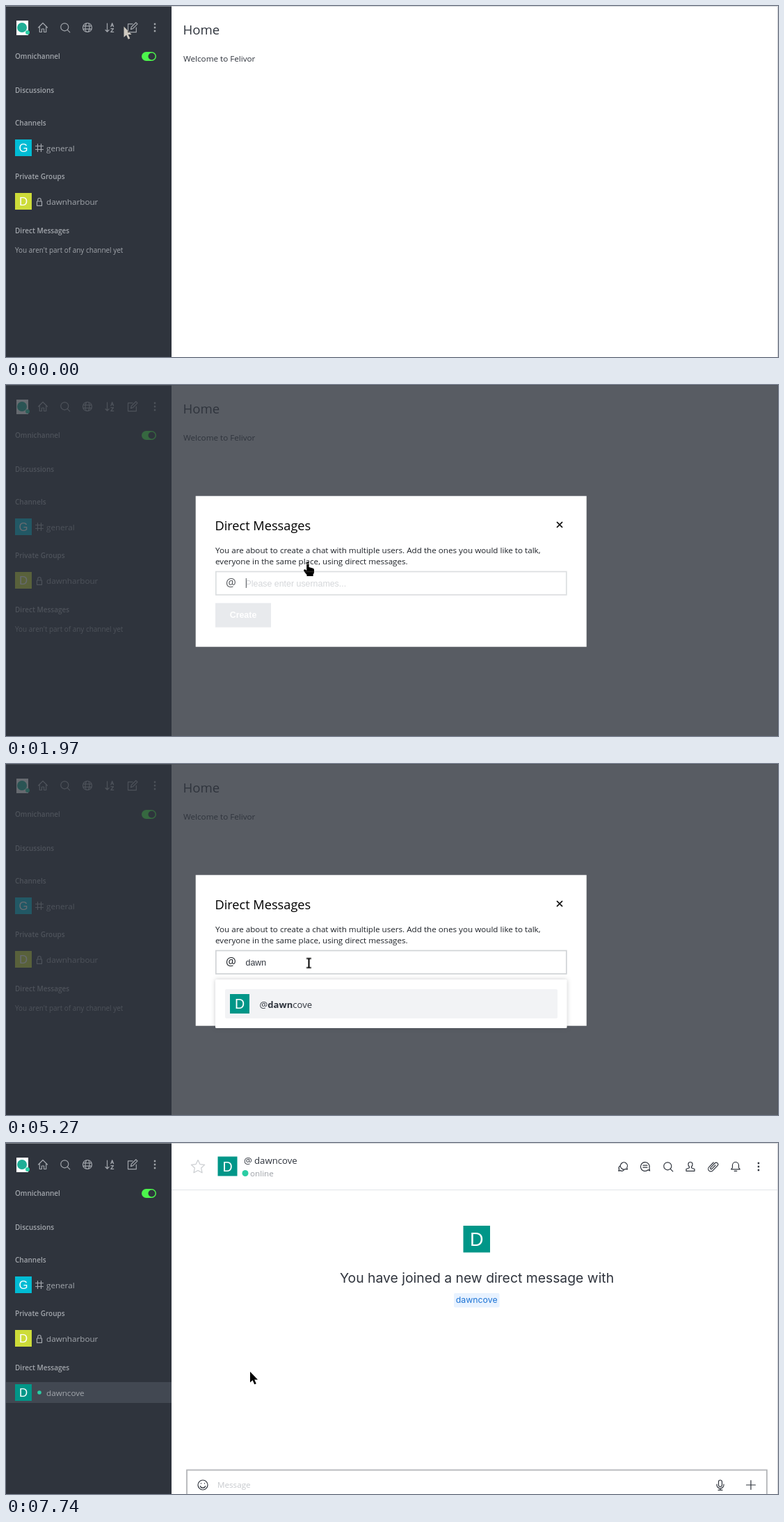
Write an HTML page that moves like this. It is 1110 px wide and 505 px high and loops after 8000 ms.

```html
<!DOCTYPE html>
<html lang="en">
<head>
<meta charset="utf-8">
<title>Starting a direct message</title>
<style>
html, body { margin: 0; width: 100%; height: 100%; overflow: hidden; background: #fff; }
svg { display: block; width: 1110px; height: 505px; }
text { font: 11.66px "Open Sans", "Noto Sans", sans-serif; white-space: pre; }
.arial { font: 12.4px "Liberation Sans", Arial, sans-serif; }
.inter { font: 12.3px Inter, sans-serif; text-anchor: middle; }
.head { font-size: 10px; font-weight: 600; }
.bold { font-weight: 700; }
.pale { fill: #c6c9cd; }
.line { fill: none; stroke: currentColor; stroke-width: 1.2; stroke-linejoin: round; stroke-linecap: round; }
.solid { fill: currentColor; }
.avatar text { fill: #fff; font-family: "Liberation Sans", Arial, sans-serif; text-anchor: middle; }
.cursor { fill: #fff; mix-blend-mode: difference; }
.shadow { filter: drop-shadow(0 0 3px rgba(47, 52, 61, .25)); }
</style>
</head>
<body>
<svg viewBox="0 0 1110 505">
  <defs>
    <path id="i-home" class="line" d="M-6.5 0L0-6.5 6.5 0M-4.7-1.5V6.5H-1.6V2H1.6V6.5H4.7V-1.5"/>
    <path id="i-search" class="line" d="M4.8-.7A5.5 5.5 0 1 1-6.2-.7 5.5 5.5 0 1 1 4.8-.7M3.3 3.3L6.8 6.8"/>
    <path id="i-globe" class="line" d="M6.5 0A6.5 6.5 0 1 1-6.5 0 6.5 6.5 0 1 1 6.5 0M3 0A3 6.5 0 1 1-3 0 3 6.5 0 1 1 3 0M-6-2.2H6M-6 2.2H6"/>
    <path id="i-sort" class="line" d="M-3.5-6V6M-6 3.5L-3.5 6-1 3.5M1.8-1.2L3.7-6.3 5.6-1.2M2.5-2.8H5M1.9 1.6H5.5L1.8 6.4H5.7"/>
    <path id="i-edit" class="line" d="M0-5.2H-6.5V6.7H5.3V0M-2.5 2.6L-1.7-.7 4.9-7.2 7-5.1 .5 1.5Z"/>
    <path id="i-more" class="solid" d="M-1.2-6.2h2.4v2.4h-2.4zM-1.2-1.2h2.4v2.4h-2.4zM-1.2 3.8h2.4v2.4h-2.4z"/>
    <path id="i-hash" class="line" d="M-2.5-5.5V5.5M2.5-5.5V5.5M-5.5-2.5H5.5M-5.5 2.5H5.5"/>
    <path id="i-lock" class="line" d="M-3.5-1H3.5V5.3H-3.5ZM-2.2-1V-3.3A2.2 2.2 0 0 1 2.2-3.3V-1"/>
    <path id="i-people" class="line" d="M1.8-1A1.8 1.8 0 1 1-1.8-1 1.8 1.8 0 1 1 1.8-1M-3 5.2C-3 1.5 3 1.5 3 5.2ZM-2.2-4A1.6 1.6 0 1 0-4-1.6M2.2-4A1.6 1.6 0 1 1 4-1.6M-4-1C-6.3-.6-6.3 2-5.5 3H-4M4-1C6.3-.6 6.3 2 5.5 3H4"/>
    <path id="i-talk" class="line" d="M-2.3 2.2A5 5 0 1 1 5.7 1.5L6.4 3.9 3.9 3.4A5 5 0 0 1-2.3 2.2M-4.2-1C-6 .4-6.2 2.2-5.4 3.6L-6.2 6.2-3.5 5.6C-1.8 6.5.6 6.2 1.8 4.4"/>
    <path id="i-thread" class="line" d="M4.5 4.5A6.4 6.4 0 1 1 6 2L6.6 6ZM-3-1.8H3M-3 1.2H3"/>
    <path id="i-person" class="line" d="M0-6.5C4-6.5 3.6-1.5 1.5.3V1.7L6 3.5V6.3H-6V3.5L-1.5 1.7V.3C-3.6-1.5-4-6.5 0-6.5Z"/>
    <path id="i-clip" class="line" d="M3-2L-2.2 3.4A1.3 1.3 0 0 1-4 1.6L2.2-5A2.5 2.5 0 0 1 6-1.4L-1 5.8A3.6 3.6 0 0 1-6.2.6L.2-6"/>
    <path id="i-bell" class="line" d="M-6.3 3.8L-4.5 1.5V-2A4.5 4.5 0 0 1 4.5-2V1.5L6.3 3.8ZM-1.8 6.3H1.8"/>
    <path id="i-smile" class="line" d="M7 0A7 7 0 1 1-7 0 7 7 0 1 1 7 0M-3.7 1.7C-2.5 5 2.5 5 3.7 1.7M-2.5-2.3v.3M2.5-2.3v.3"/>
    <path id="i-mic" class="line" d="M-2.5-4.5A2.5 2.5 0 0 1 2.5-4.5V0A2.5 2.5 0 0 1-2.5 0ZM-5-1V0A5 5 0 0 0 5 0V-1M0 5V7.3M-3 7.3H3"/>
    <path id="i-plus" class="line" d="M-6.5 0H6.5M0-6.5V6.5"/>
    <path id="i-star" class="line" d="M0-9.5L2.9-3.4 9.6-2.6 4.7 2 6 8.8 0 5.5-6 8.8-4.7 2-9.6-2.6-2.9-3.4Z"/>
  </defs>

  <rect width="1110" height="505" fill="#fff"/>

  <g id="home" fill="#2f343d">
    <text x="254.5" y="41.4" style="font-size:18.6px">Home</text>
    <text x="255" y="79.5">Welcome to Felivor</text>
  </g>

  <g id="chat" fill="#2f343d" color="#2f343d">
    <path d="M238 67.5H1109" stroke="#e1e4e8"/>
    <g color="#cbced1" data-icons="star:276,34"></g>
    <g data-avatar="D,304.5,19.5,28,#009688"></g>
    <text x="342" y="30" style="font-size:13.2px">@</text>
    <text x="357" y="30" style="font-size:13.2px">dawncove</text>
    <circle cx="344" cy="43.5" r="4.5" fill="#2acda4"/>
    <text x="351" y="48" fill="#9ea2a8">online</text>
    <g data-icons="talk:887,34 thread:919,34 search:952,34 person:984,34 clip:1017,34 bell:1049,34 more:1082,34"></g>
    <g data-avatar="D,657.5,119,38.5,#009688"></g>
    <text class="inter" x="677" y="201" style="font-size:19.35px">You have joined a new direct message with</text>
    <rect x="644" y="216" width="65.5" height="20.5" rx="2" fill="#e8f2ff"/>
    <text class="inter" x="676.7" y="230.3" fill="#1d74d5">dawncove</text>
    <rect x="260" y="470.5" width="834" height="50" fill="#fff" stroke="#b4b6b9" stroke-width="1.8"/>
    <text class="pale" x="304" y="496">Message</text>
    <g data-icons="smile:283,492 mic:1027,492 plus:1071,492"></g>
  </g>

  <path d="M238 .5H1109.5V505" fill="none" stroke="#d4d6d9"/>
  <rect id="shade" x="238" width="872" height="505" fill="#2f343d" opacity=".8"/>

  <rect width="238" height="505" fill="#2f343d"/>
  <g id="side" fill="#a2a6ac" color="#a2a6ac">
    <path d="M0 .5H238" stroke="#7f848b"/>
    <rect x="15" y="21" width="17" height="21" fill="#fff"/>
    <circle cx="23" cy="31" r="7" fill="#1fae96"/>
    <circle cx="31" cy="38" r="3" fill="#2acda4"/>
    <g data-icons="home:53,31 search:85,31 globe:117,31 sort:149,31 edit:182,31 more:214,31 hash:48,204 lock:48,282"></g>
    <text class="head" x="13" y="75.5">Omnichannel</text>
    <rect x="195" y="66" width="21" height="13" rx="6.5" fill="#4cf54c"/>
    <circle cx="209.5" cy="72.5" r="5" fill="#2f343d"/>
    <text class="head" x="13" y="124.7">Discussions</text>
    <text class="head" x="13" y="172">Channels</text>
    <g data-avatar="G,13,192,24,#00bcd4"></g>
    <text x="58" y="209">general</text>
    <text class="head" x="13" y="249.3">Private Groups</text>
    <g data-avatar="D,13,269,24,#cddc39"></g>
    <text x="58" y="286.3">dawnharbour</text>
    <text class="head" x="13" y="326.8">Direct Messages</text>
    <text id="none" x="13" y="355" style="font-size:9.95px">You aren't part of any channel yet</text>
    <g id="row">
      <rect y="344" width="238" height="30" fill="#424852"/>
      <g data-avatar="D,13,347,24,#009688"></g>
      <circle cx="48" cy="359" r="2.8" fill="#2acda4"/>
      <text x="58" y="363.6">dawncove</text>
    </g>
  </g>

  <g id="tip">
    <rect x="145" y="51" width="74" height="23" rx="2" fill="#1f2329"/>
    <text x="182" y="66.5" fill="#fff" text-anchor="middle" style="font-size:10.5px">Create New</text>
  </g>

  <g id="menu" fill="#2f343d" color="#2f343d">
    <rect class="shadow" x="171" y="50.5" width="142.5" height="117.5" rx="1.5" fill="#fff"/>
    <g data-icons="hash:194,80 people:194,110 talk:194,140"></g>
    <text x="206" y="84">Channel</text>
    <text x="206" y="114">Direct Messages</text>
    <text x="206" y="144">Discussion</text>
  </g>

  <g id="modal">
    <rect x="272.7" y="159.7" width="562" height="217" fill="#fff"/>
    <text x="300.4" y="208.5" style="font-size:18.2px;font-weight:500">Direct Messages</text>
    <path d="M792 197l8 8M800 197l-8 8" stroke="#000" stroke-width="1.7"/>
    <g fill="#1f2329">
      <text x="301" y="241.5">You are about to create a chat with multiple users. Add the ones you would like to talk,</text>
      <text x="301" y="257.7">everyone in the same place, using direct messages.</text>
    </g>
    <g id="field">
      <rect x="301.8" y="268.5" width="504" height="33.4" fill="none" stroke="#d0d3d6" stroke-width="1.7"/>
      <text x="316" y="290" fill="#1f2329" style="font-size:16.5px;font-weight:500">@</text>
      <g id="chip">
        <rect x="337" y="272" width="107.5" height="27" fill="#f2f3f5"/>
        <g data-avatar="D,344,277,17,#009688"></g>
        <text x="368" y="290" fill="#1f2329">dawncove</text>
        <path d="M431 283l5 5M436 283l-5 5" stroke="#2f343d"/>
      </g>
      <text id="hint" class="arial pale" y="289.5">Please enter usernames...</text>
      <text id="typed" class="arial" x="344.5" y="289.5" fill="#2f343d"></text>
      <rect id="caret" y="278" width="1" height="14" fill="#1f2329"/>
      <g id="button">
        <rect x="301" y="313.7" width="80" height="35"/>
        <text class="arial bold" x="341" y="335.4" fill="#fff" text-anchor="middle">Create</text>
      </g>
    </g>
    <g id="list">
      <rect class="shadow" x="301" y="310" width="505.5" height="70" rx="1.5" fill="#fff"/>
      <rect x="315" y="324" width="478" height="42" rx="2" fill="#f2f3f5"/>
      <g data-avatar="D,322,331,28,#009688"></g>
      <text x="364.5" y="350.7" fill="#2f343d" style="font-size:13.1px">@<tspan class="bold">dawn</tspan>cove</text>
    </g>
  </g>

  <path id="arrow" class="cursor" d="M0 0V15.6L3.6 12.3 6.2 18.3 8.8 17.2 6.2 11.4H11Z"/>
  <path id="hand" class="cursor" d="M-1.8.5C-1.8-1.4 1.6-1.4 1.6.5V6L7.5 7.7Q9 8.3 9 10V13Q9 15 7.6 16.5V19H-1.5V17Q-4 14.5-6 11Q-5.6 8.6-3.5 9.6L-1.8 11Z"/>
  <path id="beam" class="cursor" d="M-3.5-7.5H3.5V-5.7H1V5.7H3.5V7.5H-3.5V5.7H-1V-5.7H-3.5Z"/>
  <circle id="click" r="10.7" fill="#faf000" opacity=".52"/>
</svg>

<script>
const $ = id => document.getElementById(id);

for (const g of document.querySelectorAll('[data-icons]'))
  g.innerHTML = g.dataset.icons.split(' ').map(item => {
    const [name, at] = item.split(':'), [x, y] = at.split(',');
    return `<use href="#i-${name}" x="${x}" y="${y}"/>`;
  }).join('');

for (const g of document.querySelectorAll('[data-avatar]')) {
  const [letter, x, y, size, fill] = g.dataset.avatar.split(',');
  g.setAttribute('class', 'avatar');
  g.innerHTML = `<rect x="${x}" y="${y}" width="${size}" height="${size}" fill="${fill}"/>
    <text x="${+x + size / 2}" y="${+y + size * .75}" style="font-size:${size * .7}px">${letter}</text>`;
}

// start time, cursor, x, y, visible parts, typed text
const steps = [
  [0, 'arrow', 169.5, 29.5, 'home'],
  [280, 'hand', 184, 29, 'home'],
  [560, 'hand', 184, 29, 'home tip click'],
  [850, 'hand', 184, 29, 'home menu'],
  [1110, 'hand', 209, 86, 'home menu'],
  [1390, 'hand', 216, 107, 'home menu'],
  [1670, 'hand', 216, 107, 'home menu click'],
  [1970, 'hand', 434, 256, 'home modal hint caret'],
  [2250, 'beam', 435.5, 286.5, 'home modal hint'],
  [2530, 'beam', 435.5, 286.5, 'home modal hint click'],
  [2800, 'beam', 435.5, 286.5, 'home modal hint'],
  [3080, 'beam', 435.5, 286.5, 'home modal hint caret'],
  [3360, 'beam', 435.5, 286.5, 'home modal hint'],
  [3630, 'beam', 435.5, 286.5, 'home modal', 'd'],
  [4160, 'beam', 435.5, 286.5, 'home modal', 'da'],
  [4730, 'beam', 435.5, 286.5, 'home modal', 'daw'],
  [5000, 'beam', 435.5, 286.5, 'home modal', 'dawn'],
  [5270, 'beam', 435.5, 286.5, 'home modal list', 'dawn'],
  [5530, 'hand', 447, 329, 'home modal list caret', 'dawn'],
  [5800, 'hand', 444, 368, 'home modal list caret', 'dawn'],
  [6080, 'hand', 443, 346, 'home modal list', 'dawn'],
  [6350, 'hand', 443, 346, 'home modal list click', 'dawn'],
  [6900, 'hand', 443, 346, 'home modal list hint'],
  [7190, 'hand', 351, 330, 'home modal chip hint'],
  [7480, 'hand', 351, 330, 'home modal chip hint click'],
  [7740, 'arrow', 351, 329, 'chat row']
];
const parts = ['home', 'chat', 'row', 'tip', 'menu', 'modal', 'chip', 'hint', 'caret', 'list', 'arrow', 'hand', 'beam', 'click'];
const show = (id, on) => $(id).style.display = on ? '' : 'none';
let current;

function draw(now) {
  const t = now % 8000;
  const step = steps.findLast(s => s[0] <= t);
  if (step !== current) {
    current = step;
    const [start, cursor, x, y, visible, typed = ''] = step;
    const on = [cursor, ...visible.split(' ')];
    const modal = on.includes('modal'), chip = on.includes('chip');
    for (const id of parts) show(id, on.includes(id));
    show('none', !on.includes('row'));
    show('shade', modal);
    $('side').style.opacity = modal ? .27 : 1;
    $('field').style.opacity = start === 1970 ? .75 : 1;
    for (const id of [cursor, 'click']) $(id).setAttribute('transform', `translate(${x} ${y})`);
    $('typed').textContent = typed;
    $('caret').setAttribute('x', 344.8 + (typed ? $('typed').getComputedTextLength() : 0));
    $('hint').setAttribute('x', chip ? 457.5 : 344.5);
    $('button').setAttribute('transform', `translate(0 ${chip ? 1.7 : 0})`);
    $('button').setAttribute('fill', !chip ? '#e1e4e8' : start === 7480 ? '#77abfa' : '#1d74f5');
  }
  requestAnimationFrame(draw);
}
requestAnimationFrame(draw);
</script>
</body>
</html>
```
